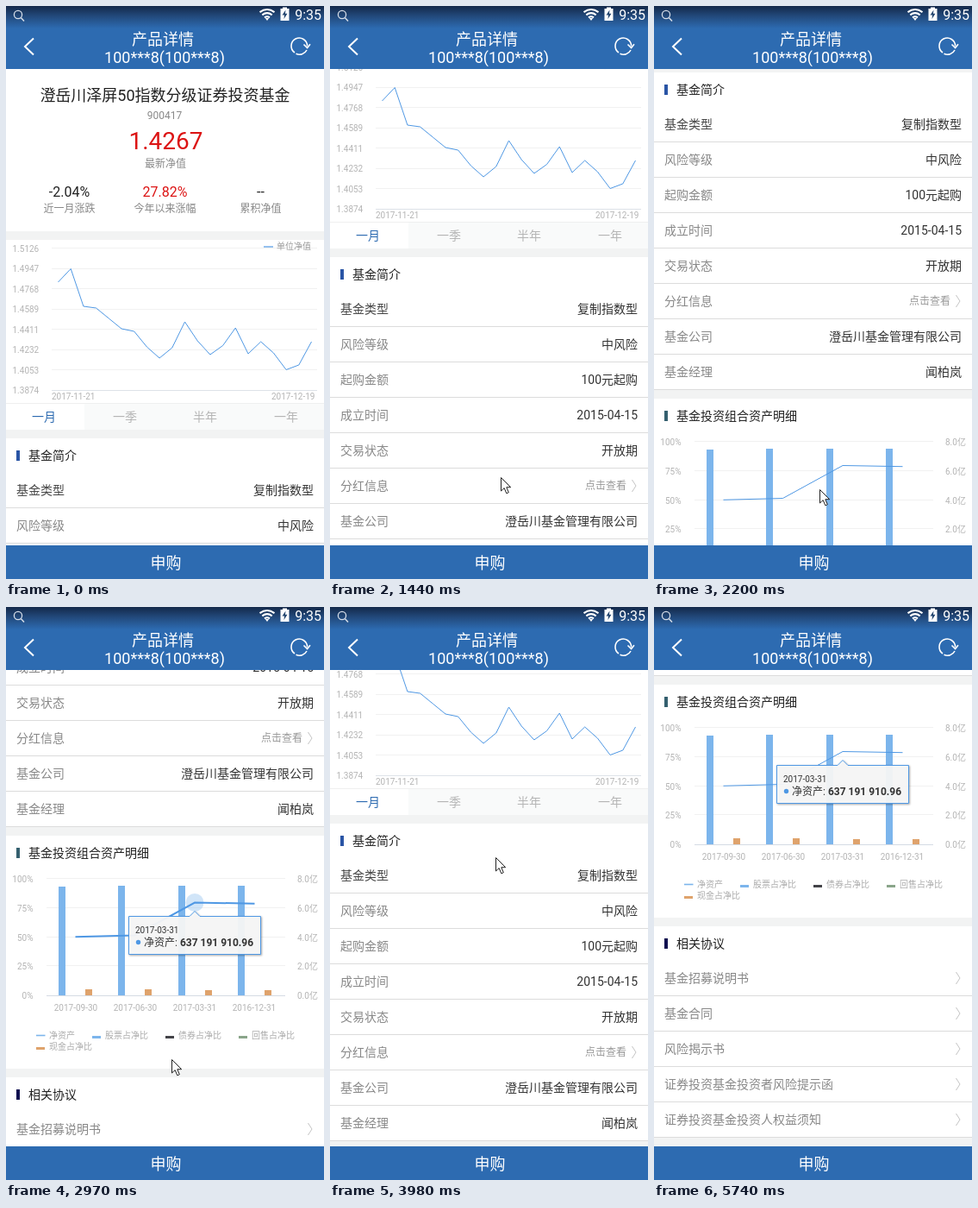
Write an HTML page that moves like this. It is 369 px wide and 664 px high and loops after 5840 ms.

```html
<!DOCTYPE html>
<html lang="zh-CN">
<head>
<meta charset="utf-8">
<title>产品详情</title>
<style>
html, body { margin: 0; width: 100%; height: 100%; overflow: hidden; background: #fff; }
svg { display: block; width: 100vw; height: 100vh; }
text { font-family: Roboto, "Noto Sans CJK SC", "Noto Sans CJK", sans-serif; white-space: pre; }
</style>
</head>
<body>
<svg id="stage" viewBox="0 0 369 664"></svg>
<script>
const BLUE = '#2d6bb1', SKY = '#7cb5ec', LINE = '#4f98e4', PALE = '#b4b4b4', GREY = '#888', DARK = '#222';
const LOOP = 5840;
const STEPS = [0, 100, 220, 320, 430, 530, 640, 750, 870, 980, 1100, 1220, 1330, 1440, 1530, 1650, 1760, 1880,
  1980, 2090, 2200, 2300, 2430, 2530, 2640, 2750, 2860, 2970, 3070, 3200, 3310, 3420, 3520, 3640, 3740, 3860,
  3970, 4080, 4180, 4290, 4410, 4510, 4620, 4730, 4850, 4960, 5070, 5190, 5300, 5400, 5510, 5620, 5740];

// Keys: [step, value...], linear in between.
const SCROLL = [[4, 0], [13, 210], [20, 424], [27, 614], [28, 630], [29, 560], [32, 122], [33, 30], [34, 0],
  [35, 60], [36, 250], [38, 710], [39, 789]];
const POINTER = [[1, 263, 577], [2, 232, 536], [4, 232, 536], [13, 198, 546], [20, 192, 560], [27, 192, 524],
  [32, 186, 417], [39, 196, 194], [40, 196, 261], [46, 297, 653], [50, 341, 581], [51, 215, 165]];

// Text is placed by its vertical centre.
const text = (str, x, cy, size, fill, anchor = 'start', extra = '') =>
  `<text x="${x}" y="${(cy + size * 0.365).toFixed(1)}" font-size="${size}" fill="${fill}" text-anchor="${anchor}" ${extra}>${str}</text>`;
const rect = (x, y, w, h, fill, extra = '') =>
  `<rect x="${x}" y="${y}" width="${w}" height="${h}" fill="${fill}" ${extra}/>`;
const stroke = (d, color, width = 1, extra = '') =>
  `<path d="${d}" fill="none" stroke="${color}" stroke-width="${width}" ${extra}/>`;
const hline = (x1, x2, y, color) => rect(x1, y, x2 - x1, 1, color);
const band = (y, h = 10) => rect(0, y, 369, h, '#f2f3f3');
const chevron = cy => stroke(`M350.5 ${cy - 7}L355 ${cy}L350.5 ${cy + 7}`, '#c4c4c4');
const heading = (str, cy, color) => rect(12, cy - 6, 4, 12, color) + text(str, 26, cy, 14, DARK);
const each = (list, fn) => list.map(fn).join('');
const polyline = points => 'M' + points.map(p => p.join(' ')).join('L');

function summary() {
  const stats = [['-2.04%', '近一月涨跌', 73.5, 'id="month"'], ['27.82%', '今年以来涨幅', 184.5, 'id="year"'],
    ['--', '累积净值', 295.5, '']];
  return text('澄岳川泽屏50指数分级证券投资基金', 184.5, 103, 18, DARK, 'middle')
    + text('900417', 184, 127, 12, GREY, 'middle')
    + text('1.4267', 185.5, 156, 28, '#dc1414', 'middle')
    + text('最新净值', 185, 183, 12, GREY, 'middle')
    + each(stats, ([value, label, x, id]) =>
      text(value, x, 215, 16, DARK, 'middle', id) + text(label, x, 235, 12, GREY, 'middle'))
    + band(261);
}

function valueChart() {
  const labels = ['1.5126', '1.4947', '1.4768', '1.4589', '1.4411', '1.4232', '1.4053', '1.3874'];
  const heights = [320, 304.5, 348, 350, 362, 374, 377, 395, 408, 396, 366, 388, 404, 393.5, 373, 403, 389, 402,
    421.5, 416, 389];
  const tabs = [['一月', 44], ['一季', 138], ['半年', 231], ['一年', 325]];
  return each(labels, (label, i) => {
      const y = 281 + i * 23.5;
      return hline(53, 361, Math.round(y) - 1, i === 7 ? '#dde2e8' : '#f1f1f1') + text(label, 7.5, y, 10, PALE);
    })
    + stroke('M299 279H310', LINE, 1.2) + text('单位净值', 314, 278.5, 10, '#999', 'start', 'font-weight="500"')
    + stroke(polyline(heights.map((y, i) => [+(60.5 + i * 14.7).toFixed(1), y])), LINE)
    + text('2017-11-21', 53, 452.5, 10, PALE) + text('2017-12-19', 358.5, 452.5, 10, PALE, 'end')
    + rect(91, 460, 278, 31, '#f9fafa') + hline(0, 369, 460, '#efefef')
    + each(tabs, ([label, x], i) => text(label, x, 476, 14, i ? '#b5b5b5' : BLUE, 'middle'))
    + band(491);
}

function profile() {
  const rows = [['基金类型', '复制指数型'], ['风险等级', '中风险'], ['起购金额', '100元起购'], ['成立时间', '2015-04-15'],
    ['交易状态', '开放期'], ['分红信息', '点击查看'], ['基金公司', '澄岳川基金管理有限公司'], ['基金经理', '闻柏岚']];
  return heading('基金简介', 521, '#2a55a5') + each(rows, ([label, value], i) => {
    const cy = 561 + i * 41;
    return text(label, 12, cy, 14, i ? GREY : '#444')
      + (i === 5 ? text(value, 344, cy, 12, '#999', 'end') + chevron(cy)
        : text(value, 357, cy, 14, '#333', 'end', i ? '' : 'font-weight="500"'))
      + hline(0, 369, cy + 20, '#dcdcdc');
  }) + band(869);
}

function assetChart() {
  const dates = ['2017-09-30', '2017-06-30', '2017-03-31', '2016-12-31'];
  const legend = [['股票占净比', 100, 1110, SKY], ['债券占净比', 185, 1110, '#434348'],
    ['回售占净比', 270, 1110, '#8aa58a'], ['现金占净比', 35, 1123, '#dfa36c']];
  const bold = ['start', 'font-weight="500"'];
  return heading('基金投资组合资产明细', 899, '#35606f')
    + each([100, 75, 50, 25, 0], (percent, i) => {
      const y = 929 + i * 33.75;
      return hline(47, 324, Math.round(y) - (i < 4), i === 4 ? '#d5dbe4' : '#f1f1f1')
        + text(percent + '%', 31.5, y + 0.5, 10, PALE, 'end') + text((8 - 2 * i).toFixed(1) + '亿', 338, y + 0.5, 10, PALE);
    })
    + each(dates, (date, i) => {
      const x = Math.round(61 + i * 69.3), top = i ? 937 : 938, cash = i < 2 ? 1057 : 1058;
      return rect(x, top, 8, 1064 - top, SKY, i === 2 ? 'id="bar"' : '') + rect(x + 31, cash, 8, 1064 - cash, '#dfa36c')
        + text(date, 81 + i * 69, 1078.5, 10, PALE, 'middle');
    })
    + '<g id="halo"><circle cx="219" cy="956.5" r="10.5" fill="#7cb5ec" opacity=".35"/></g>'
    + stroke('M80.5 996.3L149.5 994.5L219 956.5L288.5 957.7', LINE, 1, 'id="assets"')
    + stroke('M35 1110.5H45.5', SKY, 1.6) + text('净资产', 50, 1110, 10, '#aaa', ...bold)
    + each(legend, ([label, x, y, color]) => rect(x, y + 1, 10, 3, color) + text(label, x + 15, y, 10, '#aaa', ...bold))
    + band(1149);
}

function documents() {
  const titles = ['基金招募说明书', '基金合同', '风险揭示书', '证券投资基金投资者风险提示函', '证券投资基金投资人权益须知'];
  return heading('相关协议', 1179, '#101050') + each(titles, (title, i) => {
    const cy = 1219 + i * 41;
    return text(title, 12, cy, 14, GREY) + chevron(cy) + hline(0, 369, cy + 20, '#dcdcdc');
  }) + band(1404, 30);
}

function tooltip(id, left, top, width, tip, color, label, value) {
  const right = left + width, bottom = top + 44;
  const outline = `M${left} ${top}H${tip - 6}L${tip} ${top - 6}L${tip + 6} ${top}H${right}V${bottom}H${left}Z`;
  return `<g id="${id}">`
    + `<path d="${outline}" fill="#f8f8f8" fill-opacity=".93" stroke="${color}" filter="url(#shadow)"/>`
    + text('2017-03-31', left + 7.5, top + 15.5, 10, '#333')
    + `<circle cx="${left + 11}" cy="${top + 30}" r="2.7" fill="${color}"/>`
    + text(`${label}: <tspan font-weight="700">${value}</tspan>`, left + 17.5, top + 30, 12, '#333') + '</g>';
}

function chrome() {
  const white = '#fff';
  return rect(0, 0, 369, 73, BLUE) + rect(0, 0, 369, 26, 'url(#status)')
    + '<circle cx="14" cy="10" r="4.6" fill="none" stroke="#d5dde8" stroke-width="1.3"/>' + stroke('M17.3 13.5L21 17.5', '#d5dde8', 1.5)
    + stroke('M294.5 7.2Q303 .8 311.5 7.2M297.3 10.3Q303 6 308.7 10.3M300 13.3Q303 11.2 306 13.3', white, 2.1)
    + '<path d="M300.8 14H305.2L303 17Z" fill="#fff"/>'
    + '<path d="M321 1.5H326V3H328.5V17H318.5V3H321Z" fill="#fff"/><path d="M324.5 4.5L320.5 10.5H323L322.5 15L326.5 8.8H324Z" fill="#24466f"/>'
    + text('9:35', 366, 10.5, 16, white, 'end')
    + stroke('M32 37.5L22 47L32 56.5', white, 2)
    + text('产品详情', 182, 38, 18, white, 'middle') + text('100***8(100***8)', 184, 59, 18, white, 'middle')
    + stroke('M335 54A9.3 9.3 0 1 1 349.6 46.5M349 51A9.3 9.3 0 0 1 336.5 55.2', white, 1.6)
    + stroke('M345.5 44.5L349.6 48.5L353 44.2', white, 1.6)
    + rect(0, 625, 369, 39, BLUE) + text('申购', 185.5, 645, 18, white, 'middle');
}

document.getElementById('stage').innerHTML = `<defs>
  <linearGradient id="status" x2="0" y2="1"><stop stop-color="#14294a"/><stop offset=".45" stop-color="#22497b"/><stop offset="1" stop-color="${BLUE}"/></linearGradient>
  <filter id="shadow" x="-10%" y="-20%" width="120%" height="150%"><feDropShadow dx="1" dy="1" stdDeviation="1" flood-opacity=".35"/></filter>
  </defs><g id="page">`
  + summary() + valueChart() + profile() + assetChart() + documents()
  + tooltip('assetTip', 142.5, 972.5, 153, 219, LINE, '净资产', '637 191 910.96')
  + tooltip('stockTip', 140.5, 1047.5, 132, 211, '#6cabe6', '股票占净比', '94.64%')
  + '</g>' + chrome()
  + '<path id="pointer" d="M.5 .5V16L4.2 12.6L6.8 18.8L9.3 17.7L6.8 11.7H11.7Z" fill="#fff" stroke="#222"/>';

const part = Object.fromEntries([...document.querySelectorAll('#stage [id]')].map(el => [el.id, el]));
const show = (el, on) => el.setAttribute('visibility', on ? 'visible' : 'hidden');

function at(keys, step) {
  const next = keys.findIndex(key => key[0] >= step);
  if (next === 0) return keys[0].slice(1);
  if (next < 0) return keys[keys.length - 1].slice(1);
  const a = keys[next - 1], b = keys[next], k = (step - a[0]) / (b[0] - a[0]);
  return a.slice(1).map((v, i) => Math.round(v + (b[i + 1] - v) * k));
}

function draw(step) {
  const lineHover = (step >= 21 && step < 39) || step === 51;
  const barHover = step >= 39 && step < 51;
  part.page.setAttribute('transform', `translate(0 ${-at(SCROLL, step)[0]})`);
  part.pointer.setAttribute('transform', `translate(${at(POINTER, step)})`);
  show(part.pointer, (step >= 1 && step < 47) || step === 50 || step === 51);
  show(part.assetTip, lineHover || step > 51);
  show(part.stockTip, barHover);
  show(part.halo, lineHover);
  part.assets.setAttribute('stroke-width', lineHover ? 2 : 1);
  part.bar.setAttribute('fill', barHover ? '#92cbff' : SKY);
  part.month.setAttribute('fill', step < 20 ? DARK : '#1f9a32');
  part.year.setAttribute('fill', step < 20 ? '#dc1414' : '#a62024');
}

function tick() {
  const now = performance.now() % LOOP;
  draw(STEPS.findLastIndex(start => start <= now));
  requestAnimationFrame(tick);
}
tick();
</script>
</body>
</html>
```
